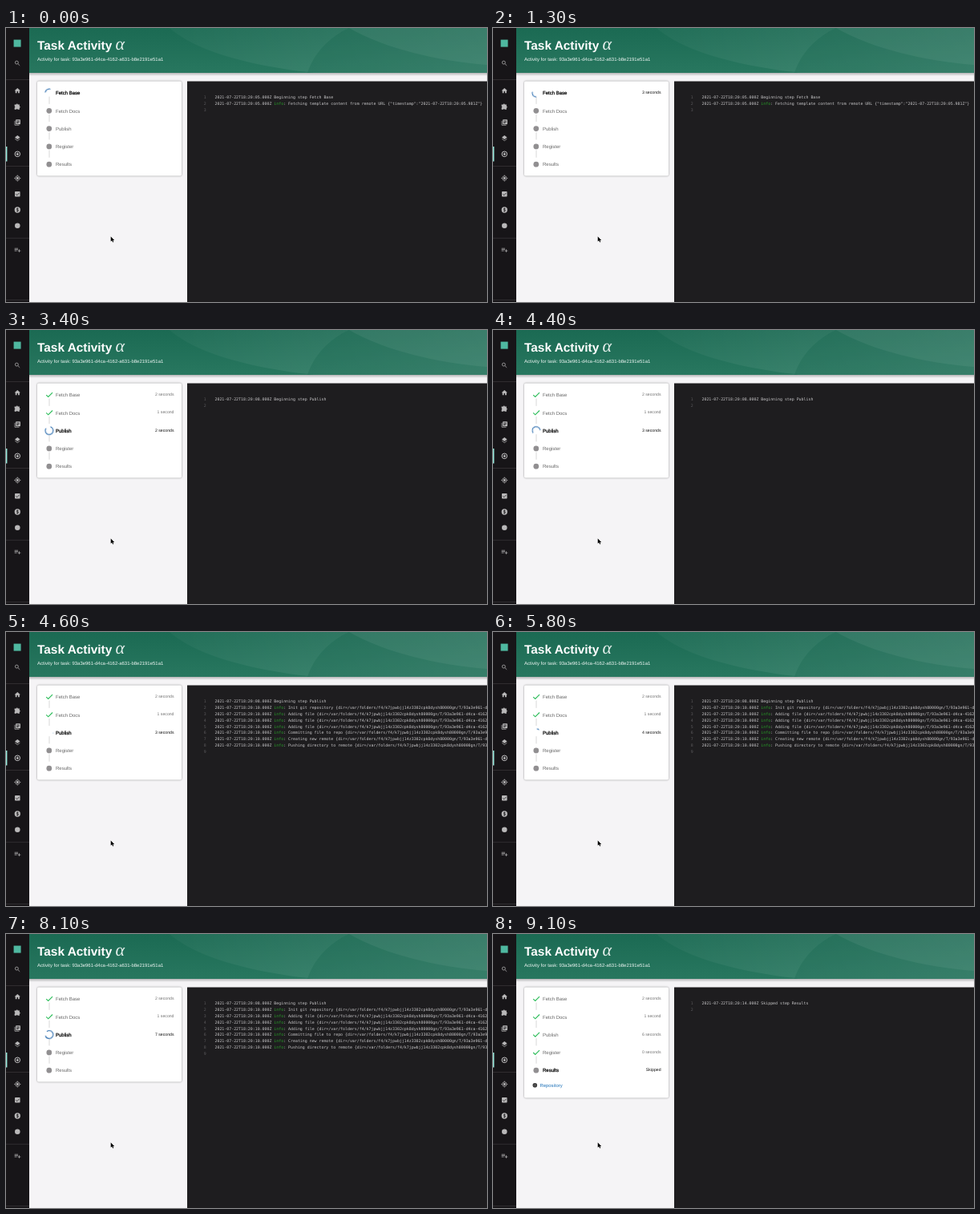
Recreate the animation shown at these times as an HTML page. Size 600x342 px, loop 9300 ms.

```html
<!DOCTYPE html>
<html lang="en">
<head>
<meta charset="utf-8">
<title>Task Activity</title>
<style>
  html, body { margin: 0; width: 100%; height: 100%; overflow: hidden; background: #f5f4f6; }
  svg { display: block; width: 600px; height: 342px; }
  text { font-family: "Liberation Sans", Arial, sans-serif; text-rendering: geometricPrecision; }
  .title { font-size: 15.4px; font-weight: 700; fill: #fff; }
  .alpha { font: italic 22px "Liberation Serif", "Noto Serif", serif; fill: #e4efeb; }
  .sub { font-size: 5.97px; fill: #eef6f3; }
  .card { fill: #fff; filter: drop-shadow(0 .7px .9px rgba(0, 0, 0, .42)); }
  .label { font-size: 6px; fill: #686868; }
  .time { font-size: 5.17px; fill: #707070; text-anchor: end; }
  .active text { fill: #0c0c0c; }
  .active .label { stroke: #0c0c0c; stroke-width: .25px; }
  .link { font-size: 5.9px; fill: #1f72b8; }
  .join { stroke: #bdbdbd; stroke-width: .6; }
  .dot { fill: #918f91; }
  .check { fill: none; stroke: #2dbd5a; stroke-width: 1.15; }
  .log text { font: 4.92px "DejaVu Sans Mono", "Liberation Mono", monospace; fill: #c9c8ca; }
  .log .num { fill: #5c5a5d; text-anchor: end; }
  .log .info { fill: #28a428; }
  .icon { fill: #b9b8b9; }
  .icon .line { fill: none; stroke: #b9b8b9; stroke-width: 2; }
  .icon .cut { fill: none; stroke: #171518; stroke-width: 2; }
  .rule { stroke: #3b393c; stroke-width: .7; }

  .ring {
    fill: none; stroke: #2d6eaf; stroke-width: 4.6;
    animation: spin 1.4s linear infinite paused, dash 1.4s ease-in-out infinite paused;
    animation-delay: calc(var(--age, 0) * -1ms);
  }
  @keyframes spin { from { transform: rotate(0deg); } to { transform: rotate(360deg); } }
  @keyframes dash {
    0% { stroke-dasharray: 1px, 200px; stroke-dashoffset: 0; }
    50% { stroke-dasharray: 100px, 200px; stroke-dashoffset: -15px; }
    100% { stroke-dasharray: 100px, 200px; stroke-dashoffset: -125px; }
  }
</style>
</head>
<body>
<svg viewBox="0 0 600 342" xmlns="http://www.w3.org/2000/svg">
  <defs>
    <linearGradient id="base" x1="0" y1="0" x2="0" y2="1">
      <stop offset="0" stop-color="#1b6a53"/><stop offset="1" stop-color="#28775f"/>
    </linearGradient>
    <linearGradient id="wave" x1="0" y1="0" x2="1" y2="0">
      <stop offset="0" stop-color="#fff" stop-opacity=".03"/><stop offset="1" stop-color="#fff" stop-opacity=".13"/>
    </linearGradient>
    <linearGradient id="fall" x1="0" y1="0" x2="0" y2="1">
      <stop offset="0" stop-color="#000" stop-opacity=".26"/><stop offset="1" stop-color="#000" stop-opacity="0"/>
    </linearGradient>
  </defs>

  <rect width="600" height="342" fill="#f5f4f6"/>
  <rect x="29" y="56" width="571" height="4" fill="url(#fall)"/>
  <rect x="29" width="571" height="56" fill="url(#base)"/>
  <path d="M204 0C236 28 300 47 384 56H600V0Z" fill="url(#wave)"/>
  <path d="M428 0C402 12 384 32 376 56H600V0Z" fill="#0b5a44" opacity=".22"/>
  <path d="M428 0C470 24 530 40 600 46V0Z" fill="#fff" opacity=".06"/>
  <text class="title" x="39" y="27">Task Activity</text>
  <text class="alpha" x="136.5" y="27.4">α</text>
  <text class="sub" x="39" y="41.2">Activity for task: 93a3e961-d4ca-4162-a631-b8e2191e51a1</text>

  <rect width="29" height="342" fill="#171518"/>
  <path class="rule" d="M0 64.5H29M0 172.5H29M0 262.3H29M0 339.5H29"/>
  <rect y="148" width="1.4" height="18.5" fill="#9bf0e1"/>
  <rect x="9.6" y="14.6" width="9" height="9" fill="#4fb8a0"/>
  <g id="icons"></g>

  <rect id="card" class="card" x="39" y="66.5" width="180" height="118" rx="1.8"/>
  <g id="steps"></g>
  <g id="repo">
    <circle cx="52.3" cy="188.7" r="2.8" fill="#333"/>
    <path d="M49.6 188.7H55M52.3 186V191.4" stroke="#999" stroke-width=".35"/>
    <text class="link" x="58.5" y="190.8">Repository</text>
  </g>

  <rect x="226" y="66.5" width="374" height="275.5" fill="#1e1d1f"/>
  <g id="log" class="log"></g>

  <path d="M130.7 260.2V266.6L132.2 265.3L133.2 267.5L134.3 267L133.3 264.9H135.2Z"
    fill="#000" stroke="#fff" stroke-width=".5" paint-order="stroke"/>
</svg>

<script>
const LOOP = 9300, STEP = 100;
const PUBLISH_LOG = 4572, FINISH = 8200;
const $ = id => document.getElementById(id);

// Sidebar icons on a 24-unit grid: centre y and markup
const icons = [
  [44, '<g class="line"><circle cx="9.5" cy="9.5" r="5.4"/><path d="M13.5 13.5L20 20"/></g>'],
  [78.3, '<path d="M10 20v-6h4v6h5v-8h3L12 3 2 12h3v8z"/>'],
  [98, '<path d="M2 5H8A2.5 2.5 0 1 1 13 5H19V11A2.5 2.5 0 1 1 19 16V22H13A2.6 2.6 0 0 0 8 22H2V16A2.6 2.6 0 0 0 2 11Z"/>'],
  [118, '<path class="line" d="M3 6V21H18"/><rect x="6" y="2" width="16" height="16" rx="2"/><path class="cut" d="M9 6.5H19M9 10H19M9 13.5H15"/>'],
  [137.6, '<path d="M12 2L21 9L12 16L3 9Z"/><path class="line" d="M3.5 14L12 20.5L20.5 14"/>'],
  [157.3, '<g class="line" style="stroke:#fff"><circle cx="12" cy="12" r="9"/><path d="M12 7V17M7 12H17"/></g>'],
  [187.5, '<circle cx="12" cy="12" r="4"/><g class="line"><circle cx="12" cy="12" r="7.5"/><path d="M12 1V5M12 19V23M1 12H5M19 12H23"/></g>'],
  [207.3, '<rect x="3" y="3" width="18" height="18" rx="2"/><path class="cut" d="M6.5 12L10.5 16L18 8"/>'],
  [227, '<circle cx="12" cy="12" r="10"/><path class="cut" d="M15.5 8.5C14 6.5 9 7 9 9.5C9 12.5 15.5 11 15.5 14.3C15.5 17 10 17.3 8.5 15M12 5V19"/>'],
  [246.8, '<circle cx="12" cy="12" r="9"/>'],
  [277, '<path class="line" d="M2 7H14M2 11H14M2 15H10M18 10V20M13 15H23"/>']
];
$('icons').innerHTML = icons.map(([y, art]) =>
  `<g class="icon" transform="translate(14.3 ${y}) scale(.365) translate(-12 -12)">${art}</g>`).join('');

// from/to: server clock seconds; start/end: when the page learns of them
const steps = [
  { name: 'Fetch Base', from: 5, to: 7, start: 0, end: 1780 },
  { name: 'Fetch Docs', from: 7, to: 8, start: 1780, end: 2560 },
  { name: 'Publish', from: 8, to: 14, start: 2560, end: FINISH },
  { name: 'Register', from: 14, to: 14, start: FINISH, end: FINISH },
  { name: 'Results', start: FINISH, end: Infinity, skipped: true }
];
const mounts = [-1120, 1010, 1780, 2560, PUBLISH_LOG];

$('steps').innerHTML = steps.map((s, i) => `
  <g transform="translate(0 ${81 + i * 22.3})">
    ${i < 4 ? '<path class="join" d="M54 4.6V13.8"/>' : ''}
    <circle class="dot" cx="53.8" r="3.35"/>
    <path class="check" d="M50.2 .1L52.7 2.5L58 -2.8"/>
    <g class="spin" transform="translate(53.9 0) scale(.243)"><circle class="ring" r="20.2"/></g>
    <text class="label" x="62" y="2.2">${s.name}</text>
    <text class="time" x="209.5" y="1"></text>
  </g>`).join('');
const rows = [...$('steps').children].map(el => {
  const find = c => el.querySelector('.' + c);
  return { el, dot: find('dot'), check: find('check'), spin: find('spin'), ring: find('ring'), time: find('time') };
});

const show = (el, on) => { el.style.display = on ? '' : 'none'; };
const stamp = (sec, ms = '000') => `2021-07-22T18:20:${String(sec).padStart(2, '0')}.${ms}Z`;
const info = (sec, text) => `${stamp(sec)} <tspan class="info">info</tspan>: ${text}`;
const fetchLog = (sec, name, kind, ms) => [
  `${stamp(sec)} Beginning step ${name}`,
  info(sec, `Fetching ${kind} content from remote URL {"timestamp":"${stamp(sec, ms)}"}`)
];
const dir = '{dir=/var/folders/f4/k7jpwbjj14z3302cpk8dysh80000gn/T/93a3e961-d4ca-4162-a631-b8e2191e51a1';
const publish = [`${stamp(8)} Beginning step Publish`];
const gitWork = ['Init git repository', 'Adding file', 'Adding file', 'Adding file',
  'Committing file to repo', 'Creating new remote', 'Pushing directory to remote'];

const logs = [
  [0, fetchLog(5, 'Fetch Base', 'template', '981')],
  [1780, fetchLog(7, 'Fetch Docs', 'plain', '412')],
  [2560, publish],
  [PUBLISH_LOG, publish.concat(gitWork.map(w => info(10, `${w} ${dir}`)))],
  [FINISH, [`${stamp(14)} Skipped step Results`]]
];

let shownLog;
function drawLog(t) {
  const lines = logs.filter(([at]) => t >= at).pop()[1];
  if (lines === shownLog) return;
  shownLog = lines;
  $('log').innerHTML = [...lines, ''].map((line, i) => {
    const y = 88.2 + i * 7.83;
    return `<text class="num" x="249.6" y="${y}">${i + 1}</text><text x="260.5" y="${y}">${line}</text>`;
  }).join('');
}

// Durations refresh once a second, at the latest tick
function duration(s, t) {
  if (s.skipped) return t >= s.start ? 'Skipped' : '';
  const n = Math.floor((t - 100) / 1000), tick = n * 1000 + 100;
  if (n < 0 || tick < s.start) return '';
  const sec = (tick >= s.end ? s.to : 7 + n) - s.from;
  return `${sec} second${sec === 1 ? '' : 's'}`;
}

function draw(t) {
  const age = t - mounts.filter(m => t >= m).pop();
  steps.forEach((s, i) => {
    const r = rows[i], done = t >= s.end, active = t >= s.start && !done;
    const spinning = active && !s.skipped;
    r.el.classList.toggle('active', active);
    show(r.check, done);
    show(r.spin, spinning);
    show(r.dot, !done && !spinning);
    r.ring.style.setProperty('--age', age);
    r.time.textContent = duration(s, t);
  });
  show($('repo'), t >= FINISH);
  $('card').setAttribute('height', t >= FINISH ? 138 : 118);
  drawLog(t);
}

const begin = performance.now();
function frame() {
  const t = (performance.now() - begin) % LOOP;
  draw(Math.floor(t / STEP) * STEP);
  requestAnimationFrame(frame);
}
frame();
</script>
</body>
</html>
```
